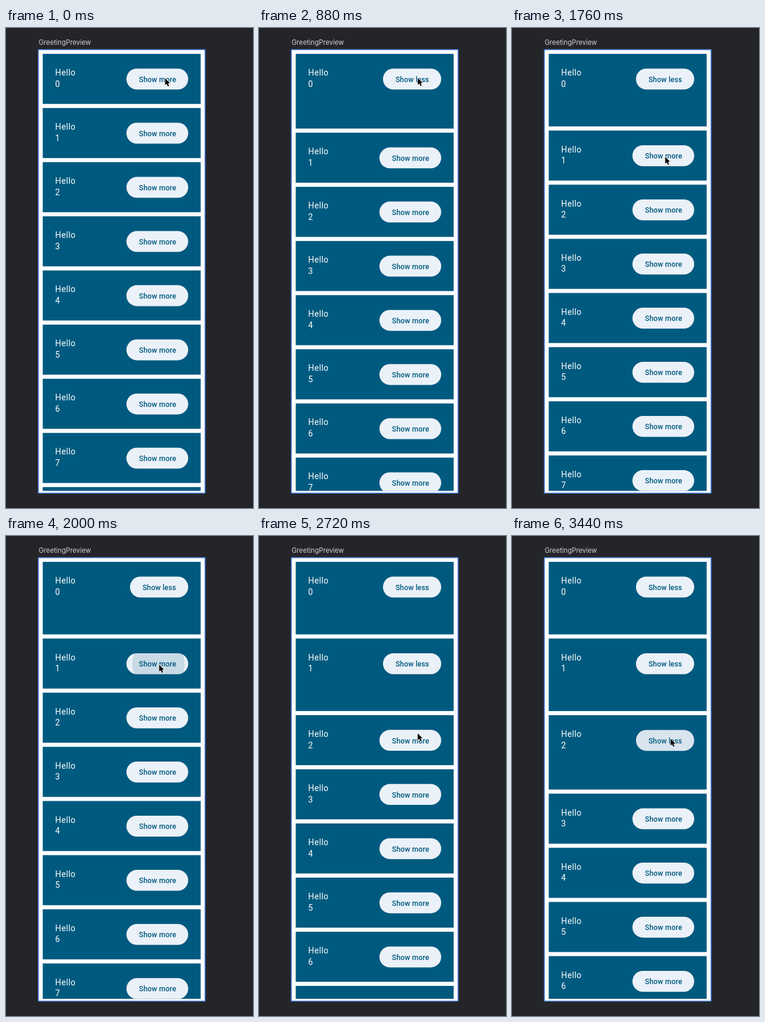
These frames come from a looping animation (412x798 px, 3520 ms). An HTML page with a canvas:

```html
<!DOCTYPE html>
<html lang="en">
<head>
<meta charset="utf-8">
<style>
  html, body { margin: 0; width: 100%; height: 100%; overflow: hidden; background: #242529; }
  canvas { display: block; width: 412px; height: 798px; }
</style>
</head>
<body>
<canvas id="stage"></canvas>
<script>
const W = 412, H = 798, LOOP = 3520, STEP = 80;
const BLUE = '#005a7f', PILL = '#ebf1f8';
const DP = 0.869;            // pixels per layout unit
const PITCH = 90.03, CARD = 83.2, GAP = PITCH - CARD;
const TOP = 43, LEFT = 61.3, RIGHT = 324.7;

// One entry per card that opens: press and release time in ms
const clicks = [
  { press: 436, release: 536 },
  { press: 1900, release: 2049 },
  { press: 3147, release: 3249 },
];

// Pointer stops: time, x, y
const stops = [
  [0, 265.5, 83.5], [640, 264.8, 83], [920, 264.8, 83], [1200, 261.6, 166],
  [1600, 255.5, 214], [2320, 255.5, 214], [2720, 264.7, 328],
  [2960, 264.5, 337], [LOOP, 264.5, 337],
];

const canvas = document.getElementById('stage');
const ctx = canvas.getContext('2d');
const ratio = window.devicePixelRatio || 1;
canvas.width = W * ratio;
canvas.height = H * ratio;

const clamp = v => Math.min(1, Math.max(0, v));
const smooth = v => v * v * (3 - 2 * v);

// Damped spring from 0 to 1: damping ratio 0.5, stiffness 200
function spring(ms) {
  if (ms <= 0) return 0;
  const s = ms / 1000, decay = Math.sqrt(200) / 2, freq = decay * Math.sqrt(3);
  return 1 - Math.exp(-decay * s) * (Math.cos(freq * s) + Math.sin(freq * s) / Math.sqrt(3));
}

// The button row hides the first part of the added padding
function extraHeight(click, t) {
  return click ? Math.max(0, 48 * DP * spring(t - click.release) - 4.3) : 0;
}

function pointer(t) {
  const i = stops.findIndex(s => s[0] > t);
  const [t0, x0, y0] = stops[i - 1], [t1, x1, y1] = stops[i];
  const k = smooth((t - t0) / (t1 - t0));
  return [x0 + (x1 - x0) * k, y0 + (y1 - y0) * k];
}

function text(str, x, y, font, color, spacing) {
  ctx.font = font;
  ctx.letterSpacing = spacing + 'px';
  ctx.fillStyle = color;
  ctx.fillText(str, x, y);
}

function ripple(click, t, x, y, w, h) {
  const age = t - click.press;
  const alpha = 0.15 * clamp(age / 75) * (1 - clamp((age - 225) / 150));
  if (alpha <= 0) return;
  const k = smooth(clamp(age / 225));
  const [px, py] = pointer(t);
  const cx = px + (x + w / 2 - px) * k, cy = py + (y + h / 2 - py) * k;
  ctx.save();
  ctx.clip();
  ctx.globalAlpha = alpha;
  ctx.fillStyle = BLUE;
  ctx.beginPath();
  ctx.arc(cx, cy, w * (0.3 + 0.3 * k), 0, 7);
  ctx.fill();
  ctx.restore();
}

function button(y, click, t) {
  const open = click && t >= click.release;
  const x = open ? 206.8 : 200.9, w = 303.9 - x, h = 40 * DP;
  ctx.beginPath();
  ctx.roundRect(x, y, w, h, h / 2);
  ctx.fillStyle = PILL;
  ctx.fill();
  if (click) ripple(click, t, x, y, w, h);
  text(open ? 'Show less' : 'Show more', x + 24 * DP, y + 22.2,
    '500 12.17px Roboto, sans-serif', BLUE, 0.087);
}

function card(i, y, h, t) {
  ctx.fillStyle = BLUE;
  ctx.fillRect(LEFT, y, RIGHT - LEFT, h);
  const font = '13.9px Roboto, sans-serif';
  text('Hello', 82.1, y + 36.2, font, '#fff', 0.43);
  text(String(i), 82.1, y + 54.8, font, '#fff', 0.43);
  button(y + 24.5, clicks[i], t);
}

function arrow([x, y]) {
  const p = [[0, 0], [0, 11.6], [2.6, 9.2], [4.5, 13.5], [6.5, 12.6], [4.7, 8.5], [8.1, 8.3]];
  ctx.beginPath();
  p.forEach(([dx, dy]) => ctx.lineTo(x + dx, y + dy));
  ctx.closePath();
  ctx.lineJoin = 'round';
  ctx.lineWidth = 1.6;
  ctx.strokeStyle = '#fff';
  ctx.stroke();
  ctx.fillStyle = '#000';
  ctx.fill();
}

function draw(t) {
  ctx.setTransform(ratio, 0, 0, ratio, 0, 0);
  ctx.fillStyle = '#242529';
  ctx.fillRect(0, 0, W, H);
  text('GreetingPreview', 54.5, 27.6, '11.2px Inter, sans-serif', '#d0d1d4', 0);

  ctx.fillStyle = '#fdfdfe';
  ctx.fillRect(54, 36, 278, 737);
  ctx.strokeStyle = '#4682e6';
  ctx.lineWidth = 1.5;
  ctx.strokeRect(54, 36, 278, 737.2);

  ctx.save();
  ctx.beginPath();
  ctx.rect(55, 37, 276, 732.4);
  ctx.clip();
  let y = TOP;
  for (let i = 0; y < 770; i++) {
    const h = CARD + extraHeight(clicks[i], t);
    card(i, y, h, t);
    y += h + GAP;
  }
  ctx.restore();
  arrow(pointer(t));
}

function tick() {
  const t = performance.now() % LOOP;
  draw(t - t % STEP);
  requestAnimationFrame(tick);
}
tick();
</script>
</body>
</html>
```
